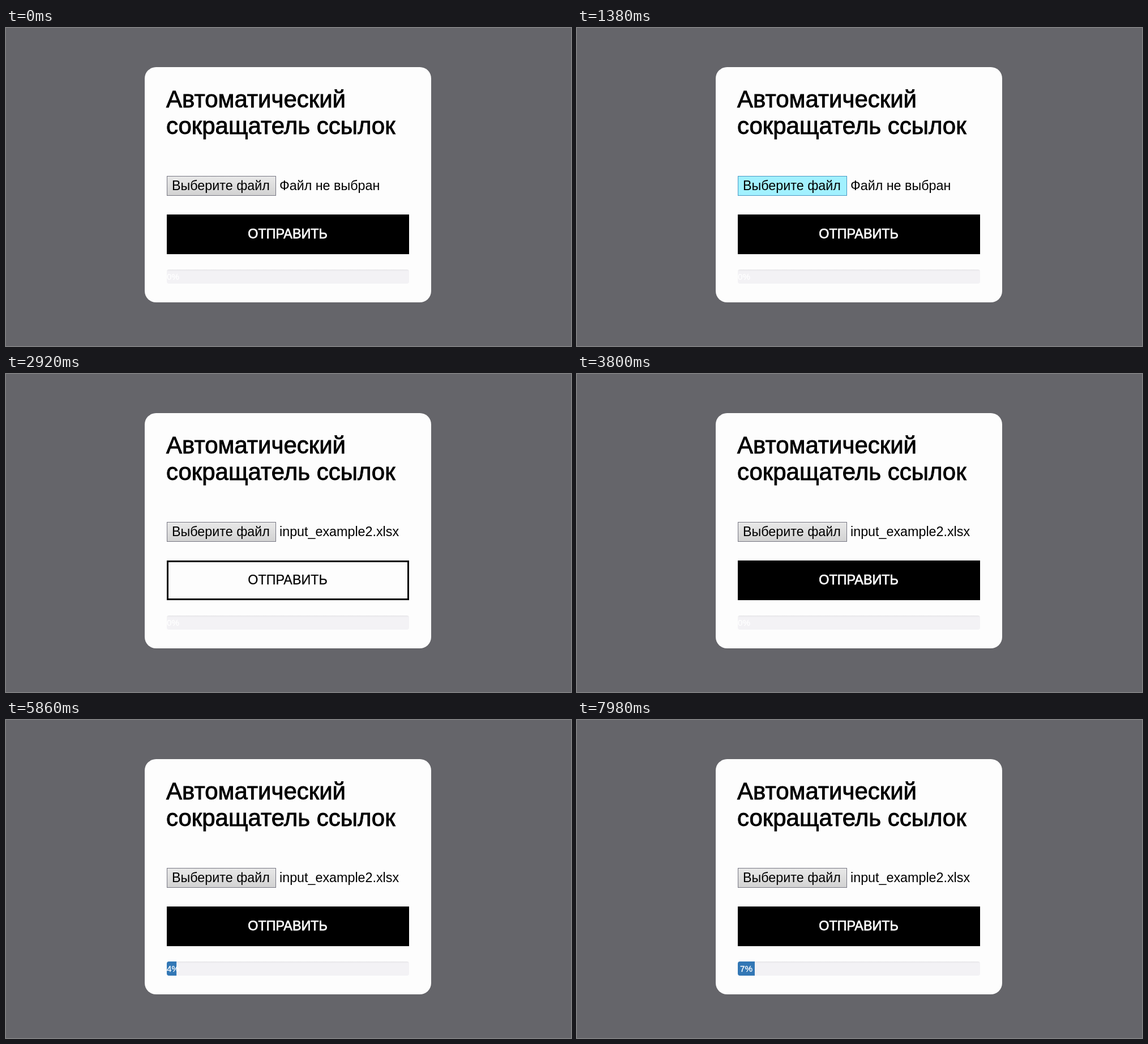
Animation, 998 px wide and 561 px high, one loop 8000 ms. Source, as an HTML page:

```html
<!DOCTYPE html>
<html lang="ru">
<head>
<meta charset="utf-8">
<style>
  html, body { margin: 0; width: 100%; height: 100%; overflow: hidden; background: #65656a; }
  svg { display: block; width: 100vw; height: 100vh; font: 23.3px "Liberation Sans", Arial, sans-serif; }
  .title { font-size: 42px; stroke: #000; stroke-width: .9px; }
  .send { text-anchor: middle; }
  .percent { font-size: 15.2px; fill: #fff; stroke: #fff; stroke-width: .35px; }
</style>
</head>
<body>
<svg viewBox="0 0 998 561">
  <defs>
    <linearGradient id="face" x2="0" y2="1">
      <stop stop-color="#e9e9e9"/>
      <stop offset="1" stop-color="#d2d2d2"/>
    </linearGradient>
    <linearGradient id="groove" x2="0" y2="1">
      <stop stop-color="#e6e6e8"/>
      <stop offset=".14" stop-color="#f3f2f5"/>
    </linearGradient>
    <clipPath id="track"><rect x="284" y="426" width="428" height="25" rx="4"/></clipPath>
  </defs>
  <rect width="998" height="561" fill="#65656a"/>
  <rect x="245" y="69" width="506" height="415" rx="20" fill="#fdfdfd"/>

  <text class="title" x="283" y="139.5">Автоматический</text>
  <text class="title" x="283" y="187">сокращатель ссылок</text>

  <rect id="choose" x="284.5" y="261.5" width="192" height="34"/>
  <text x="293" y="286">Выберите файл</text>
  <text id="file" x="483" y="286"></text>

  <rect x="284" y="329" width="428" height="70"/>
  <rect id="sendFace" x="287" y="332" width="422" height="64" fill="#fdfdfd"/>
  <text id="send" class="send" x="497.5" y="371">ОТПРАВИТЬ</text>

  <g clip-path="url(#track)">
    <rect x="284" y="426" width="428" height="25" fill="url(#groove)"/>
    <rect id="bar" x="284" y="426" height="25" fill="#3277b5"/>
    <text id="percent" class="percent" y="443.5"></text>
  </g>
</svg>
<script>
const LOOP = 8000;
const BAR_LEFT = 284, TRACK_WIDTH = 428, LABEL_WIDTH = 22;
const FADE = 120;

const el = id => document.getElementById(id);
const clamp = (v, lo, hi) => Math.min(hi, Math.max(lo, v));
const fade = (t, start) => clamp((t - start) / FADE, 0, 1);

function setAttrs(id, attrs) {
  for (const name in attrs) el(id).setAttribute(name, attrs[name]);
}

function render(t) {
  const choosing = t >= 300 && t < 1800;
  setAttrs('choose', {
    fill: choosing ? '#a2f1ff' : 'url(#face)',
    stroke: choosing ? '#4799c4' : '#777783'
  });
  el('file').textContent = t < 1800 ? 'Файл не выбран' : 'input_example2.xlsx';

  const hover = fade(t, 2200) - fade(t, 3360);
  const shade = Math.round(255 * (1 - hover));
  const ink = `rgb(${shade},${shade},${shade})`;
  setAttrs('sendFace', { opacity: hover });
  setAttrs('send', { fill: ink, stroke: ink, 'stroke-width': 0.75 - 0.5 * hover });

  const percent = clamp(Math.floor((t - 3250) / 650), 0, 7);
  const width = TRACK_WIDTH * percent / 100;
  setAttrs('bar', { width });
  setAttrs('percent', { x: BAR_LEFT + Math.max(0, (width - LABEL_WIDTH) / 2) });
  el('percent').textContent = percent + '%';
}

const start = performance.now();
function tick() {
  render((performance.now() - start) % LOOP);
  requestAnimationFrame(tick);
}
tick();
</script>
</body>
</html>
```
